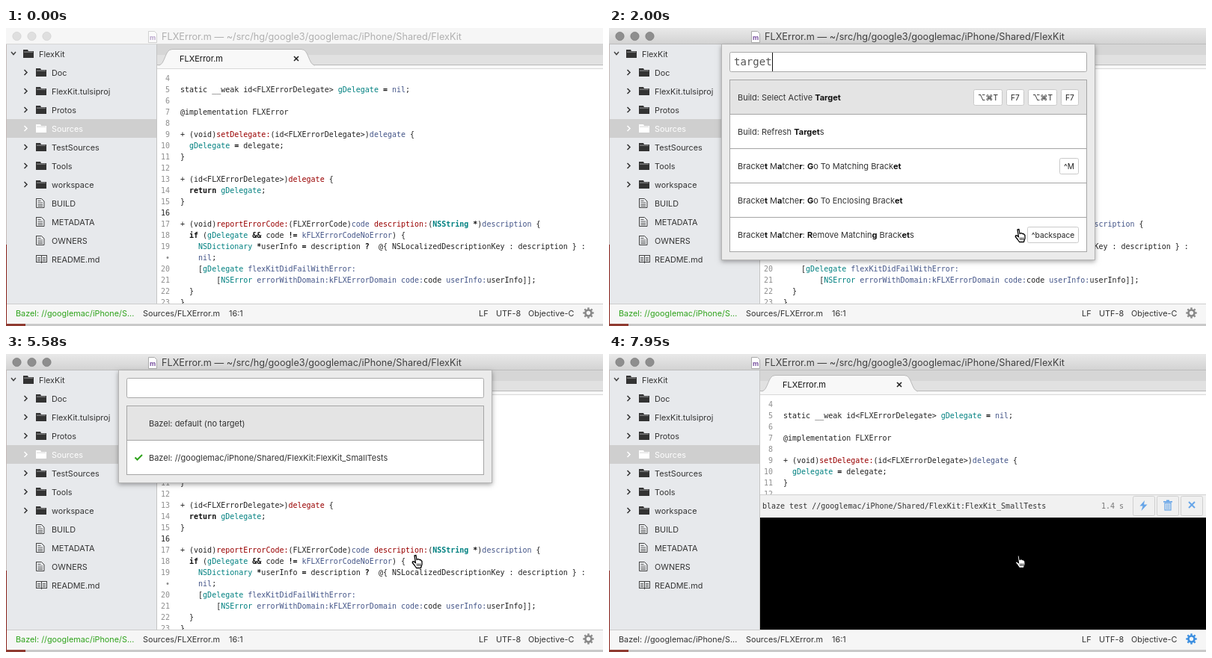
An HTML page with a canvas for the animation above (8 s loop, 798 by 399 pixels).

```html
<!DOCTYPE html>
<html lang="en">
<head>
<meta charset="utf-8">
<title>Editor build demo</title>
<style>
html, body { margin: 0; width: 100%; height: 100%; overflow: hidden; background: #fff; }
canvas { display: block; width: 798px; height: 399px; }
</style>
</head>
<body>
<canvas id="stage" width="798" height="399"></canvas>
<script>
const g = document.getElementById('stage').getContext('2d');
const LOOP = 8000;
const FAMILY = 'Inter, "DejaVu Sans", sans-serif';
const UI = '10.85px ' + FAMILY, LABEL = '11px ' + FAMILY, KEY = '10.2px ' + FAMILY;
const MONO = '"DejaVu Sans Mono", monospace';
const CODE_FONT = '10px ' + MONO;
const GREEN = '#2fa31c', DARK = '#333';

// Code colours: t/T = type, r = selector, b = name, k = keyword or operator
const INK = { t: '#008080', T: '#008080', r: '#990000', b: '#445588', k: '#111' };
const CODE = [
  ['4', ''],
  ['5', 'static __weak id<FLXErrorDelegate> §tgDelegate§ §k=§ §bnil§;'],
  ['6', ''],
  ['7', '@implementation FLXError'],
  ['8', ''],
  ['9', '+ (void)§rsetDelegate:§(id<FLXErrorDelegate>)§bdelegate§ {'],
  ['10', '  §tgDelegate§ §k=§ delegate;'],
  ['11', '}'],
  ['12', ''],
  ['13', '+ (id<FLXErrorDelegate>)§rdelegate§ {'],
  ['14', '  §kreturn§ §tgDelegate§;'],
  ['15', '}'],
  ['16', ''],
  ['17', '+ (void)§rreportErrorCode:§(FLXErrorCode)§bcode§ §rdescription:§(§TNSString§ §k*§)§bdescription§ {'],
  ['18', '  §kif§ (§tgDelegate§ §k&&§ code §k!=§ §bkFLXErrorCodeNoError§) {'],
  ['19', '    §tNSDictionary§ §k*§userInfo §k=§ description §k?§  @{ NSLocalizedDescriptionKey : description } :'],
  ['•', '    §bnil§;'],
  ['20', '    [§tgDelegate§ §bflexKitDidFailWithError:§'],
  ['21', '        [§tNSError§ §berrorWithDomain:kFLXErrorDomain§ §bcode:§code §buserInfo:§userInfo]];'],
  ['22', '  }'],
  ['23', '}']
];

const TREE = ['FlexKit', 'Doc', 'FlexKit.tulsiproj', 'Protos', 'Sources', 'TestSources',
  'Tools', 'workspace', 'BUILD', 'METADATA', 'OWNERS', 'README.md'];

// Palette rows: label with *matched* letters, then key bindings
const MATCHER = s => 'Bracke*t* M*a*tche*r*: ' + s;
const LISTS = {
  '': [['Application: About'], ['Application: Add Project Folder', '⇧⌘O'],
    ['Application: Bring All Windows To Front'], ['Application: Hide', '⌘H'],
    ['Application: Hide Other Applications', '⌥⌘H'], ['Application: Install Update'],
    ['Application: Minimize', '⌘M']],
  t: [['*T*imecop: View'], ['*T*ree View: Show'], ['*T*abs: Close Tab'], ['*T*ree View: Remove'],
    ['*T*ree View: Toggle', '⌘K ⌘B', '⌘\\'], ['*T*ree View: Rename'], ['*T*ree View: Add File']],
  ta: [['*Ta*bs: Close Tab'], ['*Ta*bs: Close Other Tabs'], ['*Ta*bs: Close All Tabs'],
    ['*Ta*bs: Close Saved Tabs'], ['*T*ree View: *A*dd File'], ['*T*ree View: *A*dd Folder'],
    ['Build: Select Active *Ta*rget', '⌥⌘T', 'F7']],
  tar: [['Build: Select Active *Tar*get', '⌥⌘T', 'F7', '⌥⌘T', 'F7'], ['Build: Refresh *Tar*gets'],
    [MATCHER('Go To Matching Bracket'), '^M'], [MATCHER('Go To Enclosing Bracket')],
    [MATCHER('Remove Matching Brackets'), '^backspace'], ['*T*ree View: *A*dd Folde*r*'],
    ['*T*abs: Close S*a*ved *T*abs']],
  target: [['Build: Select Active *Target*', '⌥⌘T', 'F7', '⌥⌘T', 'F7'], ['Build: Refresh *Target*s'],
    [MATCHER('*G*o To Matching Brack*et*'), '^M'], [MATCHER('*G*o To Enclosing Brack*et*')],
    [MATCHER('*R*emove Matchin*g* Brack*et*s'), '^backspace']]
};
const TYPED = [[500, ''], [1400, 't'], [1550, 'ta'], [1700, 'tar'], [2000, 'target']];
const BLINKS = [500, 950, 1400, 2600, 2900, 3350, 3640, 4090, 4380, 4830, 5280, 5580, 5880, 6480];

function rect(x, y, w, h, fill) {
  g.fillStyle = fill;
  g.fillRect(x, y, w, h);
}

function box(x, y, w, h, fill, line, r = 2) {
  g.beginPath();
  g.roundRect(x + .5, y + .5, w - 1, h - 1, r);
  g.fillStyle = fill;
  g.fill();
  g.strokeStyle = line;
  g.lineWidth = 1;
  g.stroke();
}

function text(s, x, y, color = DARK, font = UI, align = 'left') {
  g.font = font;
  g.fillStyle = color;
  g.textAlign = align;
  g.fillText(s, x, y);
  return x + g.measureText(s).width;
}

function poly(pts, fill, line, width = 1) {
  g.beginPath();
  for (let i = 0; i < pts.length; i += 2) g.lineTo(pts[i], pts[i + 1]);
  if (fill) {
    g.closePath();
    g.fillStyle = fill;
    g.fill();
  }
  if (line) {
    g.strokeStyle = line;
    g.lineWidth = width;
    g.stroke();
  }
}

function at(x, y, draw) {
  g.save();
  g.translate(x, y);
  draw();
  g.restore();
}

function clip(x, y, w, h, draw) {
  g.save();
  g.beginPath();
  g.rect(x, y, w, h);
  g.clip();
  draw();
  g.restore();
}

function titleBar(active) {
  const grad = g.createLinearGradient(0, 0, 0, 22);
  grad.addColorStop(0, active ? '#e9e9e9' : '#f6f6f6');
  grad.addColorStop(1, active ? '#d2d2d2' : '#f6f6f6');
  rect(0, 0, 798, 22, grad);
  rect(0, 21, 798, 1, active ? '#bdbdbd' : '#d6d6d6');
  for (const x of [14.5, 34.5, 54.5]) {
    g.beginPath();
    g.arc(x, 11, 5.6, 0, 7);
    g.fillStyle = active ? '#8e8e8e' : '#dfdfdf';
    g.fill();
    g.strokeStyle = active ? '#7c7c7c' : '#d2d2d2';
    g.lineWidth = .8;
    g.stroke();
  }
  g.globalAlpha = active ? 1 : .5;
  poly([190.5, 4.5, 198.5, 4.5, 201.5, 7.5, 201.5, 19.5, 190.5, 19.5, 190.5, 4.5], '#fff', '#aaa');
  text('m', 196, 16, '#7a52a0', 'bold 9px ' + FAMILY, 'center');
  g.globalAlpha = 1;
  text('FLXError.m — ~/src/hg/google3/googlemac/iPhone/Shared/FlexKit', 208, 16,
    active ? '#404040' : '#b0b0b0', '12.7px ' + FAMILY);
}

function folder(x, y, color) {
  poly([0, -5.5, 6, -5.5, 7, -3.5, 14, -3.5, 14, 5.5, 0, 5.5].map((v, i) => v + (i % 2 ? y : x)), color);
  rect(x + 1, y - 2.8, 12, .8, color === '#fff' ? '#ccc' : '#b5b7ba');
}

function page(x, y) {
  poly([x + .5, y - 6, x + 7.5, y - 6, x + 11, y - 2.5, x + 11, y + 6, x + .5, y + 6, x + .5, y - 6.5], null, '#444');
  for (const dy of [-3, -.5, 2, 4]) rect(x + 2.5, y + dy - .4, dy < -2 ? 4 : 6.5, .9, '#555');
}

function book(x, y) {
  g.strokeStyle = '#444';
  g.lineWidth = 1;
  g.strokeRect(x + .5, y - 4.5, 14, 9);
  rect(x + 7, y - 4, 1, 10, '#444');
  for (const dy of [-2, 0, 2]) {
    rect(x + 2, y + dy, 4, .9, '#555');
    rect(x + 9, y + dy, 4, .9, '#555');
  }
}

function sidebar() {
  rect(1, 22, 200, 347, '#e7e9ec');
  rect(1, 122, 200, 25, '#cfcfcf');
  rect(201, 22, 1, 347, '#c4c4c4');
  TREE.forEach((name, i) => {
    const y = 34 + i * 25, root = i === 0;
    const color = name === 'Sources' ? '#fff' : DARK;
    if (root) poly([7, y - 2, 10, y + 1.5, 13, y - 2], null, '#444', 1.5);
    else if (i < 8) poly([24.5, y - 3, 28, y + .5, 24.5, y + 4], null, color, 1.5);
    if (i < 8) folder(root ? 23 : 40, y + .5, color);
    else if (i < 11) page(40, y + .5);
    else book(40, y);
    text(name, root ? 44 : 61, y + 5, color);
  });
}

function codeLine(s, x, y) {
  s.split('§').forEach((part, i) => {
    const kind = i % 2 ? part[0] : '';
    const bold = kind === 'k' || kind === 'T' ? 'bold ' : '';
    x = text(kind ? part.slice(1) : part, x, y, INK[kind] || '#222', bold + CODE_FONT);
  });
}

function editor(bottom) {
  rect(202, 22, 596, 14, '#d6d6d6');
  rect(202, 36, 596, 13, '#e1e1e1');
  rect(202, 49, 596, 1, '#bababa');
  rect(202, 50, 596, 5, '#f8f8f8');
  rect(202, 54, 596, 1, '#d8d8d8');
  g.beginPath();
  g.moveTo(204, 50);
  g.bezierCurveTo(213, 49, 212, 28.5, 222, 28.5);
  g.lineTo(395, 28.5);
  g.bezierCurveTo(405, 28.5, 404, 49, 413, 50);
  g.fillStyle = '#f8f8f8';
  g.fill();
  g.strokeStyle = '#bababa';
  g.lineWidth = 1;
  g.stroke();
  text('FLXError.m', 232, 45, '#111', LABEL);
  poly([385, 38, 391, 44], null, '#222', 1.6);
  poly([391, 38, 385, 44], null, '#222', 1.6);
  rect(202, 55, 596, 314, '#fff');
  clip(202, 55, 596, bottom - 55, () => CODE.forEach(([n, s], i) => {
    const y = 71 + i * 15;
    text(n, 219, y, n === '16' ? '#222' : '#8f8f8f', CODE_FONT, 'right');
    codeLine(s, 233, y);
  }));
}

function gear(color, angle) {
  at(778.5, 381.5, () => {
    g.rotate(angle);
    g.strokeStyle = color;
    g.lineWidth = 2.6;
    g.beginPath();
    g.arc(0, 0, 4, 0, 7);
    g.stroke();
    for (let i = 0; i < 8; i++) {
      poly([0, -4.6, 0, -7.2], null, color, 2.4);
      g.rotate(Math.PI / 4);
    }
  });
}

function statusBar(building, t) {
  rect(0, 369, 798, 30, '#c9c9c9');
  rect(0, 396, 26, 3, '#8f3a30');
  rect(1, 369, 797, 27, '#f6f6f6');
  rect(1, 369, 797, 1, '#cdcdcd');
  const y = 386;
  text('Bazel: //googlemac/iPhone/S...', 13, y, building ? DARK : GREEN);
  text('Sources/FLXError.m', 183, y);
  text('16:1', 298, y);
  text('LF', 632, y);
  text('UTF-8', 655, y);
  text('Objective-C', 698, y);
  const step = Math.floor((t - 6630) / 146);
  gear(building ? '#3b8ee0' : '#888', building ? step * Math.PI / 12 : 0);
}

function desktopEdge() {
  rect(0, 22, 1, 268, '#c4bab8');
  rect(0, 290, 1, 106, '#8a241c');
}

function keys(list, y) {
  let right = 628;
  for (const k of [...list].reverse()) {
    g.font = KEY;
    const w = Math.round(g.measureText(k).width) + 12;
    box(right - w, y - 11, w, 22, '#fff', '#cacaca');
    text(k, right - w / 2, y + 4, '#222', KEY, 'center');
    right -= w + 5;
  }
}

function panel(bottom) {
  g.save();
  g.shadowColor = 'rgba(0,0,0,.35)';
  g.shadowBlur = 6;
  g.shadowOffsetY = 2;
  rect(150, 22, 500, bottom - 22, '#b4b4b4');
  g.restore();
  rect(151, 22, 498, bottom - 23, '#ebebeb');
  box(161, 32, 478, 27, '#fff', '#a9a9a9');
}

function rows(count, bottom, selected, draw) {
  clip(161, 69, 478, bottom - 69, () => {
    rect(161, 69, 478, count * 46 + 1, '#a5a5a5');
    for (let i = 0; i < count; i++) {
      const top = 70 + i * 46;
      rect(162, top, 476, 45, i === selected ? '#e4e4e4' : '#fff');
      draw(i, top + 23);
    }
  });
}

function input(s, t) {
  text(s, 167, 50, '#555', '14px ' + MONO);
  const on = BLINKS.filter(b => b <= t).length % 2;
  if (on) rect(167 + Math.round(s.length * 8.43), 33, 1, 25, '#111');
}

function palette(t) {
  const typed = TYPED.filter(p => p[0] <= t).pop()[1];
  const list = LISTS[typed];
  const bottom = Math.min(381, 70 + list.length * 46);
  panel(bottom + 11);
  input(typed, t);
  rows(list.length, bottom, 0, (i, y) => {
    const [label, ...bound] = list[i];
    let x = 172;
    label.split('*').forEach((part, j) => {
      x = text(part, x, y + 4, j % 2 ? '#111' : DARK, (j % 2 ? 'bold ' : '') + LABEL);
    });
    keys(bound, y);
  });
}

function targets(t) {
  panel(173);
  input('', t);
  const selected = t >= 4980 && t < 6030 ? 0 : 1;
  const names = ['default (no target)', '//googlemac/iPhone/Shared/FlexKit:FlexKit_SmallTests'];
  rows(2, 162, selected, (i, y) => {
    text('Bazel: ' + names[i], 191, y + 4, DARK, LABEL);
    if (i) poly([172.5, y - .5, 175.5, y + 2.5, 182, y - 4], null, GREEN, 2);
  });
}

function buildPanel(t) {
  rect(202, 188, 596, 31, '#f1f1f1');
  rect(202, 188, 596, 1, '#cfcfcf');
  rect(202, 219, 596, 150, '#000');
  text('blaze test //googlemac/iPhone/Shared/FlexKit:FlexKit_SmallTests', 205, 207, DARK, CODE_FONT);
  const secs = Math.floor((t - 6550) / 100 + 1e-6) / 10;
  text(secs.toFixed(1) + ' s', 658, 207, '#777', CODE_FONT);
  for (const x of [700, 732, 764]) box(x, 190, 30, 27, '#f0f0f0', '#cfcfcf');
  const blue = '#67a5e8';
  poly([716, 196, 709.5, 203.5, 713.5, 203.5, 711.5, 210, 719.5, 201.5, 715, 201.5], blue);
  g.strokeStyle = blue;
  g.lineWidth = 1.2;
  g.strokeRect(743, 199.5, 8, 9.5);
  rect(741, 197, 12, 1.6, blue);
  rect(745, 195.5, 4, 1.5, blue);
  for (const x of [744.8, 746.6, 748.4]) rect(x, 200.5, .9, 7.5, blue);
  poly([775, 198, 783, 206], null, blue, 2);
  poly([783, 198, 775, 206], null, blue, 2);
}

function hand() {
  at(542.5, 268.5, () => {
    g.lineJoin = 'round';
    poly([3.5, 1.5, 5.5, 1, 6.6, 7, 8.5, 6, 10, 7, 11.5, 7, 13.5, 9, 13.5, 13, 12, 18, 6, 18,
      4, 15, .8, 11, 1, 9.3, 3, 9.5, 5, 11.3], '#fff', '#000', 1.3);
    for (const x of [7, 9, 11]) poly([x, 12, x + .3, 15.5], null, '#000', .9);
  });
}

function draw(t) {
  const active = t >= 500, building = t >= 6630;
  titleBar(active);
  sidebar();
  editor(building ? 188 : 369);
  if (building) buildPanel(t);
  statusBar(building, t);
  desktopEdge();
  if (active && t < 3640) palette(t);
  else if (active && !building) targets(t);
  if (active) hand();
}

const start = performance.now();
function tick() {
  draw((performance.now() - start) % LOOP);
  requestAnimationFrame(tick);
}
tick();
</script>
</body>
</html>
```
